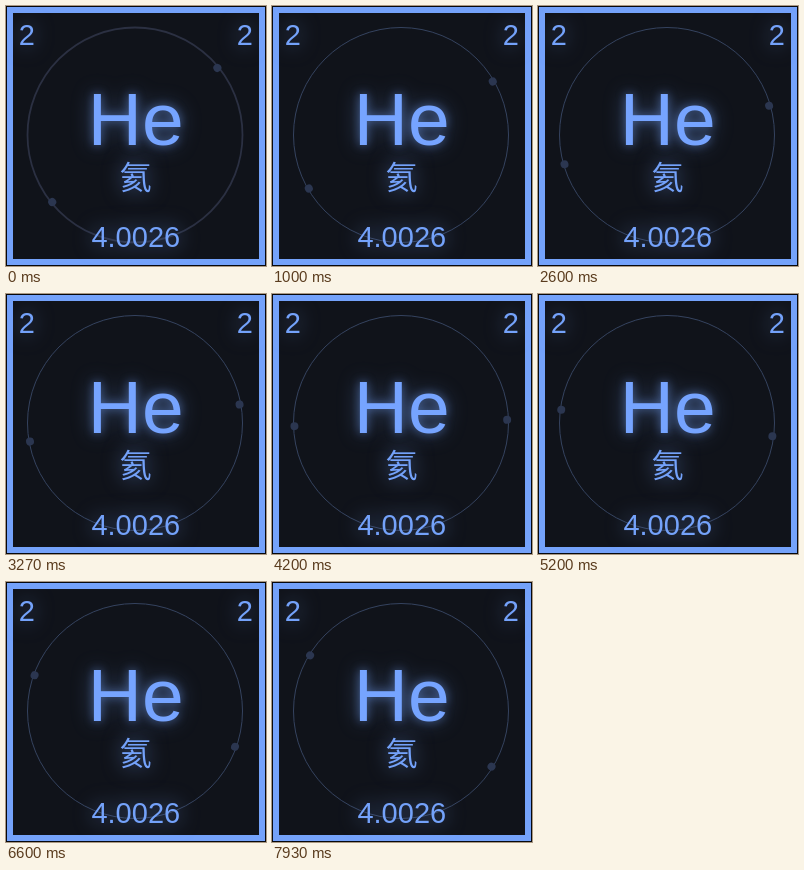
Animation, 260 px wide and 260 px high, one loop 8 s. Source, as an HTML page:

```html
<!DOCTYPE html>
<html lang="zh">
<head>
<meta charset="utf-8">
<title>氦</title>
<style>
html, body { margin: 0; width: 100%; height: 100%; overflow: hidden; background: #06080d; }
svg { display: block; width: 100vw; height: 100vh; }
text {
  font-family: "Liberation Sans", Arial, sans-serif;
  font-size: 29px;
  fill: #74a2fa;
  text-anchor: middle;
  filter: drop-shadow(0 0 10px rgba(116, 162, 250, .55));
}
.symbol {
  font-size: 75px;
  fill: #76a4ff;
  filter: drop-shadow(0 0 5px rgba(116, 162, 250, .5)) drop-shadow(0 0 10px rgba(116, 162, 250, .35));
}
.name { font: 32px "Noto Sans CJK SC", "Noto Sans CJK", sans-serif; }
</style>
</head>
<body>
<svg viewBox="0 0 260 260">
  <rect x="4" y="4" width="252" height="252" fill="#10131a" stroke="#74a2fa" stroke-width="6"/>
  <circle id="ring" cx="129" cy="129" r="107.5" fill="none"/>
  <g id="electrons" fill="#2b3650">
    <circle cx="235.2" cy="129" r="4"/>
    <circle cx="22.4" cy="129" r="4"/>
  </g>
  <text x="20.8" y="39.3">2</text>
  <text x="238.8" y="39.3">2</text>
  <text class="symbol" x="129.8" y="138.5">He</text>
  <text class="name" x="129.5" y="183.2">氦</text>
  <text x="129.8" y="240.5">4.0026</text>
</svg>
<script>
const LOOP = 8000, FPS = 15, START = -39.1, SPEED = 8.9;
const ring = document.getElementById('ring');
const electrons = document.getElementById('electrons');

function draw(now) {
  const t = now % LOOP;
  // Motion advances in whole steps after a short initial hold.
  const step = t < 130 ? 0 : Math.floor((t + 6.7) * FPS / 1000);
  const angle = START + SPEED * step / FPS;
  electrons.setAttribute('transform', `rotate(${angle} 128.8 129)`);
  ring.setAttribute('stroke', step ? '#35435f' : '#2b3042');
  ring.setAttribute('stroke-width', step ? 1 : 1.8);
  requestAnimationFrame(draw);
}
draw(0);
</script>
</body>
</html>
```
